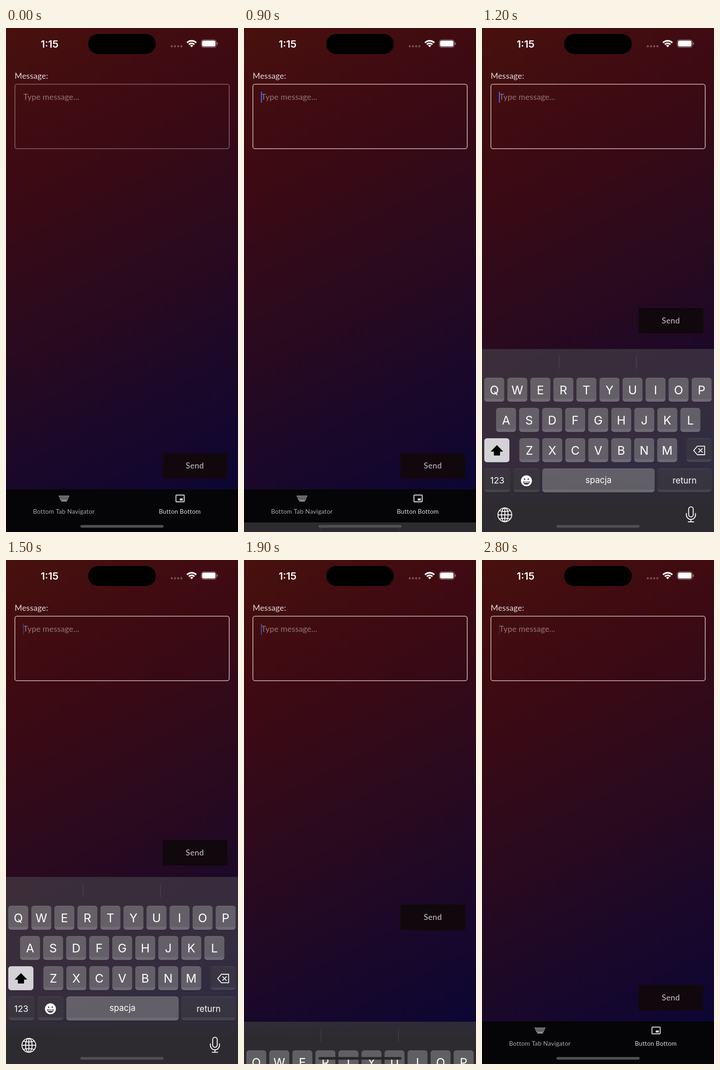
Animation of 508 by 1102 pixels, one loop 2.9 s. Source, as an HTML page with a canvas:

```html
<!DOCTYPE html>
<html lang="en">
<head>
<meta charset="utf-8">
<title>Message form with keyboard</title>
<style>
  html, body { margin: 0; width: 100%; height: 100%; overflow: hidden; background: #000; }
  canvas { display: block; width: 508px; height: 1102px; }
</style>
</head>
<body>
<canvas id="stage" width="508" height="1102"></canvas>
<script>
const W = 508, H = 1102, LOOP = 2900, TICK = 100;
const KEYBOARD_H = 409, TAB_TOP = 1009;
const APP_FONT = 'Lato, "Open Sans", sans-serif';
const SYS_FONT = 'Inter, Roboto, sans-serif';
const c = document.getElementById('stage').getContext('2d');

// Motion
const clamp = x => Math.max(0, Math.min(1, x));
const lerp = (a, b, p) => a + (b - a) * p;
const smooth = p => p * p * (3 - 2 * p);
const spring = ms => {
  const x = 0.018 * Math.max(0, ms);
  return 1 - (1 + x) * Math.exp(-x);
};
const ease = (t, start) => smooth(clamp((t - start) / 250));

function caretAlpha(t) {
  if (t < 500) return 0;
  if (t < 1300) return 1;
  const phase = t % 1000;
  if (phase >= 300 && phase < 700) return clamp((600 - phase) / 270);
  if (phase >= 700) return clamp((phase - 750) / 220);
  return 1;
}

function stateAt(t) {
  const closing = t > 1700;
  const shown = closing ? 1 - spring(t - 1743) : spring(t - 880);
  const raised = closing ? 1 - ease(t, 1784) : ease(t, 920);
  return {
    closing,
    focused: t >= 500,
    caret: caretAlpha(t),
    rest: KEYBOARD_H * (1 - shown),
    visible: shown > 0.002,
    sendY: lerp(929, 612, raised),
    darkBar: (t >= 1000 && t < 1100) || (t >= 1800 && t < 2100)
  };
}

// Drawing helpers
function rect(x, y, w, h, color) {
  c.fillStyle = color;
  c.fillRect(x, y, w, h);
}
function round(x, y, w, h, r, fill, stroke, line = 1) {
  c.beginPath();
  c.roundRect(x, y, w, h, r);
  if (fill) { c.fillStyle = fill; c.fill(); }
  if (stroke) { c.strokeStyle = stroke; c.lineWidth = line; c.stroke(); }
}
function disc(x, y, r, color) {
  c.fillStyle = color;
  c.beginPath();
  c.arc(x, y, r, 0, 7);
  c.fill();
}
function text(str, x, y, font, color, align = 'left', spacing = 0) {
  c.font = font;
  c.fillStyle = color;
  c.textAlign = align;
  c.letterSpacing = spacing + 'px';
  c.fillText(str, x, y);
}
function path(points, close) {
  c.beginPath();
  points.forEach(([x, y]) => c.lineTo(x, y));
  if (close) c.closePath();
}

function background() {
  const g = c.createLinearGradient(0, 0, W, TAB_TOP);
  g.addColorStop(0, 'rgb(72,17,14)');
  g.addColorStop(0.25, 'rgb(62,10,18)');
  g.addColorStop(0.55, 'rgb(42,10,30)');
  g.addColorStop(1, 'rgb(12,6,52)');
  rect(0, 0, W, H, g);
}

function statusBar() {
  text('1:15', 95.5, 42.5, '600 22px ' + SYS_FONT, '#fff', 'center');
  round(180, 13, 148, 44, 22, '#000');
  for (let i = 0; i < 4; i++) disc(363 + 7 * i, 40, 2.4, 'rgba(255,255,255,.27)');

  c.strokeStyle = '#fff';
  [[14, 3.7], [8.5, 3.4], [2.5, 5]].forEach(([r, line]) => {
    c.lineWidth = line;
    c.beginPath();
    c.arc(406.5, 42, r, -Math.PI * 0.755, -Math.PI * 0.245);
    c.stroke();
  });

  round(427.6, 25.9, 33, 16.4, 5.4, null, 'rgba(255,255,255,.45)', 1.2);
  round(429.3, 27.6, 29.4, 13, 3.8, '#fff');
  round(461.8, 31.5, 1.8, 5.2, 1, 'rgba(255,255,255,.5)');
}

function form(s) {
  text('Message:', 19, 111, '17.5px ' + APP_FONT, '#e2dadb', 'left', 0.2);
  round(19.5, 122.9, 469.2, 141, 4.5, null, s.focused ? '#ece0d8' : '#94797c', 1.3);
  text('Type message...', 38, 157, '17.5px ' + APP_FONT, '#92767a', 'left', 0.2);
  if (s.caret) {
    c.globalAlpha = s.caret;
    round(37, 139, 2.3, 24.5, 1, '#4560e8');
    c.globalAlpha = 1;
  }
}

function sendButton(y) {
  rect(343, y, 141.5, 56, '#10080c');
  text('Send', 413.5, y + 34, '17.5px ' + APP_FONT, '#cdc6c9', 'center', 0.4);
}

function tabBar() {
  rect(0, TAB_TOP, W, H - TAB_TOP, '#050406');
  const dim = '#c6c4c7', lit = '#dddbde';
  for (let row = 0; row < 3; row++) {
    const n = 8 - row;
    for (let i = 0; i < n; i++) {
      rect(127 + (i - (n - 1) / 2) * 2.9 - 1.1, 1022.6 + row * 3.6, 2.2, 2.4, dim);
    }
  }
  rect(121, 1033, 12.5, 2, dim);
  text('Bottom Tab Navigator', 126.7, 1061.5, '13.5px ' + APP_FONT, '#aeabaf', 'center', 0.25);

  round(372.2, 1021.2, 18, 14.8, 1.2, null, lit, 2);
  rect(380.4, 1028.6, 6.8, 4.6, lit);
  text('Button Bottom', 380.6, 1061.5, '13.5px ' + APP_FONT, lit, 'center', 0.2);
}

// Keyboard
const LIGHT = 'rgba(255,255,255,.29)', DARK = 'rgba(255,255,255,.1)', SHIFT = '#d4d2d6';

function key(x, y, w, color, label, size = 26, rise = 0) {
  c.save();
  c.beginPath();
  c.rect(x - 1, y + 46, w + 2, 10);
  c.roundRect(x, y, w, 52.6, 6);
  c.clip('evenodd');
  round(x, y + 1.3, w, 52.6, 6, 'rgba(0,0,0,.32)');
  c.restore();
  round(x, y, w, 52.6, 6, color);
  if (label) {
    text(label, x + w / 2, y + 26.6 + size * 0.36 - rise, size + 'px ' + SYS_FONT, '#fff', 'center');
  }
}
function letterRow(letters, x, y, pitch) {
  [...letters].forEach((ch, i) => key(x + pitch * i, y, 43.7, LIGHT, ch));
}

function shiftIcon(x, y) {
  path([[0, -11], [12.2, 1.6], [6, 1.6], [6, 10], [-6, 10], [-6, 1.6], [-12.2, 1.6]]
    .map(([dx, dy]) => [x + dx, y + dy]), true);
  c.fillStyle = c.strokeStyle = '#000';
  c.lineWidth = 1.5;
  c.lineJoin = 'round';
  c.fill();
  c.stroke();
}
function deleteIcon(x, y) {
  c.strokeStyle = '#fff';
  c.lineWidth = 1.8;
  c.lineJoin = c.lineCap = 'round';
  path([[x - 12, y], [x - 4, y - 9.3], [x + 12, y - 9.3], [x + 12, y + 9.3], [x - 4, y + 9.3]], true);
  c.stroke();
  [-1, 1].forEach(d => {
    path([[x - 1, y - 4 * d], [x + 7, y + 4 * d]]);
    c.stroke();
  });
  c.lineCap = 'butt';
}
function smiley(x, y) {
  const ink = '#4a464e';
  disc(x, y, 12, '#fff');
  disc(x - 4, y - 3.6, 1.7, ink);
  disc(x + 4, y - 3.6, 1.7, ink);
  c.beginPath();
  c.arc(x, y + 1.2, 7.4, 0, Math.PI);
  c.closePath();
  c.fill();
  rect(x - 5.4, y + 2.2, 10.8, 1.8, '#fff');
}
function globe(x, y) {
  c.strokeStyle = '#fff';
  c.lineWidth = 1.8;
  [15.2, 7.2].forEach(rx => {
    c.beginPath();
    c.ellipse(x, y, rx, 15.2, 0, 0, 7);
    c.stroke();
  });
  path([[x, y - 15], [x, y + 15]]);
  c.stroke();
  path([[x - 15, y], [x + 15, y]]);
  c.stroke();
  [-1, 1].forEach(d => {
    c.beginPath();
    c.moveTo(x - 12, y + 9.2 * d);
    c.quadraticCurveTo(x, y + 5.4 * d, x + 12, y + 9.2 * d);
    c.stroke();
  });
}
function mic(x, y) {
  round(x - 5, y - 17.5, 10, 22, 5, null, '#fff', 1.9);
  c.lineCap = 'round';
  c.beginPath();
  c.moveTo(x - 10, y - 3);
  c.lineTo(x - 10, y);
  c.arc(x, y, 10, Math.PI, 0, true);
  c.lineTo(x + 10, y - 3);
  c.moveTo(x, y + 10);
  c.lineTo(x, y + 15);
  c.moveTo(x - 6, y + 15.3);
  c.lineTo(x + 6, y + 15.3);
  c.stroke();
  c.lineCap = 'butt';
}

// Frosted panel: softened page behind a translucent grey
function panel(top, sendY) {
  background();
  const g = c.createLinearGradient(0, 975, 0, 1050);
  g.addColorStop(0, 'rgba(5,4,6,0)');
  g.addColorStop(1, 'rgba(5,4,6,1)');
  rect(0, 975, W, H - 975, g);
  if (sendY + 75 > top) {
    c.filter = 'blur(14px)';
    rect(343, sendY, 141.5, 56, '#10080c');
    c.filter = 'none';
  }
  rect(0, top, W, H - top, 'rgba(74,72,76,.58)');
}

function keyboard(s) {
  const top = H - KEYBOARD_H + s.rest;
  c.save();
  c.beginPath();
  c.rect(0, top, W, H - top);
  c.clip();
  panel(top, s.sendY);

  const grow = s.closing ? 0 : s.rest;
  const sepH = 29 * (1 - 0.55 * grow / KEYBOARD_H);
  const sepY = top + 30 - 0.046 * grow - sepH / 2;
  [168.3, 337.6].forEach(x => rect(x, sepY, 1.1, sepH, 'rgba(255,255,255,.13)'));

  const [r1, r2, r3, r4] = [0, 1, 2, 3].map(i => top + 63 + 66.1 * i);
  letterRow('QWERTYUIOP', 5, r1, 50.45);
  letterRow('ASDFGHJKL', 30.8, r2, 50.45);
  letterRow('ZXCVBNM', 81.8, r3, 50.3);
  key(5, r3, 55, SHIFT);
  shiftIcon(32.7, r3 + 27);
  key(448, r3, 55, DARK);
  deleteIcon(475.5, r3 + 26.8);
  key(5, r4, 57, DARK, '123', 19);
  key(69, r4, 57, DARK);
  smiley(97.3, r4 + 27);
  key(132, r4, 246, LIGHT, 'spacja', 18.5, 1.5);
  key(384, r4, 119, DARK, 'return', 18.5);

  const dockY = 1061 + s.rest * (s.closing ? 0.32 : 0.4);
  globe(50, dockY);
  mic(457.5, dockY);
  c.restore();
}

function draw(t) {
  const s = stateAt(t);
  background();
  statusBar();
  form(s);
  sendButton(s.sendY);
  tabBar();
  if (s.visible) keyboard(s);
  round(163, 1086.8, 182, 5.6, 2.8, s.darkBar ? '#282629' : '#514f52');
}

function loop() {
  const t = performance.now() % LOOP;
  draw(Math.floor(t / TICK) * TICK);
  requestAnimationFrame(loop);
}
loop();
</script>
</body>
</html>
```
